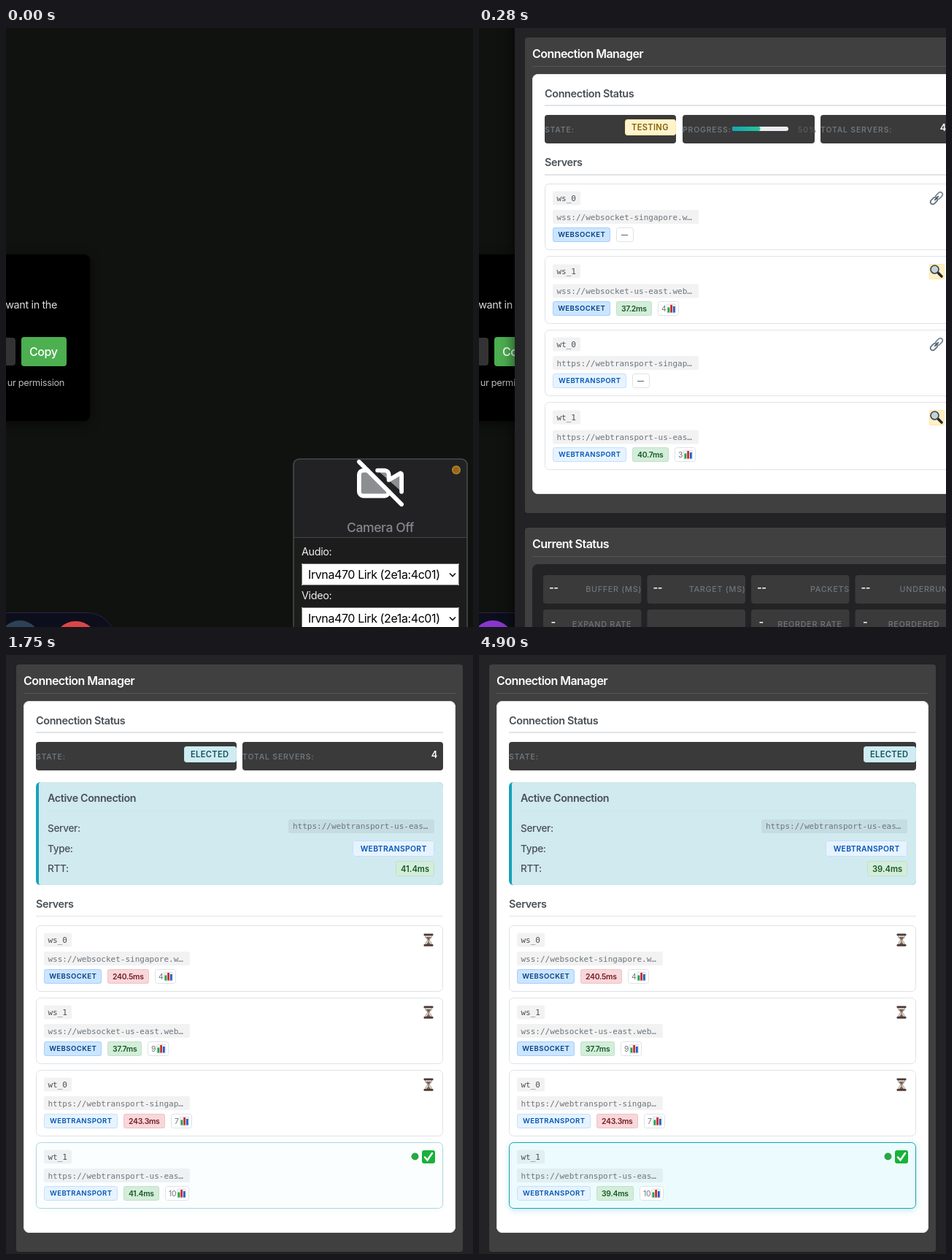
Animation, 640 px wide and 820 px high, one loop 5.46 s. Source, as an HTML page with a canvas:

```html
<!DOCTYPE html>
<html lang="en">
<head>
<meta charset="utf-8">
<title>Connection Manager</title>
<style>
html, body { margin: 0; width: 100%; height: 100%; overflow: hidden; background: #10120f; }
canvas { display: block; }
</style>
</head>
<body>
<canvas id="stage" width="640" height="820"></canvas>
<script>
const c = document.getElementById('stage').getContext('2d');
const LOOP = 5460, STEP = 70;
const SANS = 'Inter, "Liberation Sans", sans-serif';
const MONO = '"DejaVu Sans Mono", "Liberation Mono", monospace';
const GREY = '#495057', MUTED = '#6c757d', LINE = '#dee2e6', DARK = '#3a3a3a';
const DEVICE = 'Irvna470 Lirk (2e1a:4c01)';
const CAMERA = [
  'M10.66 6H14a2 2 0 0 1 2 2v2.5l5.248-3.062A.5.5 0 0 1 22 7.87v8.196',
  'M16 16a2 2 0 0 1-2 2H4a2 2 0 0 1-2-2V8a2 2 0 0 1 2-2h2',
  'M2 2l20 20'
].map(d => new Path2D(d));

const clamp = v => Math.max(0, Math.min(1, v));
const mix = (a, b, k) => `rgb(${a.map((v, i) => Math.round(v + (b[i] - v) * k))})`;

// CSS "ease" timing curve
function ease(x) {
  x = clamp(x);
  let lo = 0, hi = 1, s = x;
  for (let i = 0; i < 24; i++) {
    s = (lo + hi) / 2;
    if (.75 * s * (1 - s) + s ** 3 < x) lo = s; else hi = s;
  }
  return .3 * s * (1 - s) ** 2 + 3 * s * s * (1 - s) + s ** 3;
}

function box(x, y, w, h, r, fill, border) {
  c.beginPath();
  c.roundRect(x, y, w, h, r);
  c.fillStyle = fill;
  c.fill();
  if (!border) return;
  c.beginPath();
  c.roundRect(x + .5, y + .5, w - 1, h - 1, r);
  c.strokeStyle = border;
  c.lineWidth = 1;
  c.stroke();
}

function disc(x, y, r, fill) {
  c.beginPath();
  c.arc(x, y, r, 0, 7);
  c.fillStyle = fill;
  c.fill();
}

function line(color, width, ...pts) {
  c.beginPath();
  for (let i = 0; i < pts.length; i += 2) c.lineTo(pts[i], pts[i + 1]);
  c.strokeStyle = color;
  c.lineWidth = width;
  c.stroke();
}

function shadow(color, blur, dx, dy, draw) {
  c.save();
  c.shadowColor = color;
  c.shadowBlur = blur;
  c.shadowOffsetX = dx;
  c.shadowOffsetY = dy;
  draw();
  c.restore();
}

// y is the middle of the capitals
function text(s, x, y, size, color, { weight = 400, gap = -.025 * size, align = 'left', font = SANS } = {}) {
  c.font = `${weight} ${size}px ${font}`;
  c.letterSpacing = gap + 'px';
  c.textAlign = align;
  c.fillStyle = color;
  c.fillText(s, x, y + .364 * size);
}

const width = (s, size, weight) => {
  c.font = `${weight} ${size}px ${SANS}`;
  c.letterSpacing = -.025 * size + 'px';
  return c.measureText(s).width;
};
const mono = (s, x, y, color) => text(s, x, y, 11, color, { font: MONO, gap: 0 });
const label = (s, x, y, color = MUTED) => text(s, x, y, 10.4, color, { weight: 600, gap: .85 });
const heading = (s, x, y, color = GREY) => text(s, x, y, 14.4, color, { weight: 600 });

function drawPage(t) {
  c.fillStyle = '#10120f';
  c.fillRect(0, 0, 640, 820);

  shadow('rgba(0,0,0,.5)', 14, 0, 3, () => box(-300, 310, 415, 228, 8, '#000'));
  text('want in the', 70, 379, 14.4, '#ddd', { align: 'right' });
  box(-100, 424, 113, 38, 4, '#333');
  box(21, 423, 62, 40, 4, '#4caf50');
  text('Copy', 32, 443.5, 16, '#fff', { weight: 500 });
  text('ur permission', 80, 485, 12.8, '#bbb', { align: 'right' });

  box(-200, 800, 351, 80, 40, '#0c0f1b', '#2a2148');
  disc(19, 839, 28, t < 70 ? '#2c4257' : '#8936cf');
  disc(95.5, 842, 30, '#dc4548');

  box(394, 590, 239, 300, 8, '#1c1c1d');
  box(394, 590, 239, 107, [8, 8, 0, 0], '#222224');
  c.beginPath();
  c.roundRect(394, 590, 238, 300, 8);
  c.strokeStyle = '#484b4c';
  c.lineWidth = 1.5;
  c.stroke();
  line('#444648', 1, 395, 697.5, 631, 697.5);

  c.save();
  c.translate(478.1, 588.1);
  c.scale(2.91, 2.91);
  c.lineCap = c.lineJoin = 'round';
  c.fillStyle = '#8c8f92';
  c.strokeStyle = '#fff';
  c.lineWidth = 2;
  CAMERA.forEach(p => { c.fill(p); c.stroke(p); });
  c.restore();
  disc(617, 605, 6, '#bd862a');
  disc(617, 605, 4.5, '#94691c');
  text('Camera Off', 467, 684, 17.6, '#84878a', { weight: 500 });

  [['Audio:', 717], ['Video:', 777]].forEach(([name, y]) => {
    text(name, 405, y, 14.4, '#eee');
    box(405, y + 16, 216, 30, 1, '#fff', '#767676');
    text(DEVICE, 414, y + 31, 16, '#000');
    line('#111', 1.6, 608, y + 29.5, 612, y + 33.5, 616, y + 29.5);
  });
}

const icons = {
  search(x, y) {
    box(x - 10, y - 10, 21, 21, 1, '#fff0c4', '#fce8ac');
    c.lineCap = 'round';
    line('#26282b', 3.6, x + 2.5, y + 2.5, x + 7, y + 7);
    c.lineCap = 'butt';
    disc(x - 2.5, y - 2.5, 6.3, '#3b4248');
    disc(x - 2.5, y - 2.5, 4.7, '#c3d3da');
  },
  link(x, y) {
    c.save();
    c.translate(x, y);
    c.rotate(-Math.PI / 4);
    c.lineWidth = 1.9;
    [[-10.5, '#66747f'], [-.5, '#7d8c98']].forEach(([left, color]) => {
      c.beginPath();
      c.roundRect(left, -3.2, 11, 6.4, 3.2);
      c.strokeStyle = color;
      c.stroke();
    });
    line('#4d5962', 1.8, -4, 0, 4, 0);
    c.restore();
  },
  wait(x, y) {
    c.beginPath();
    [[-5, -7], [5, -7], [4, -3], [1, 0], [4, 4], [5, 7], [-5, 7], [-4, 4], [-1, 0], [-4, -3]]
      .forEach(([dx, dy]) => c.lineTo(x + dx, y + dy));
    c.closePath();
    c.fillStyle = '#d5dde0';
    c.fill();
    c.strokeStyle = '#8b9295';
    c.lineWidth = .8;
    c.stroke();
    c.fillStyle = '#8f5a3c';
    c.beginPath();
    [[-3.5, -4], [3.5, -4], [.5, 0], [.5, 3], [4, 7], [-4, 7], [-.5, 3], [-.5, 0]]
      .forEach(([dx, dy]) => c.lineTo(x + dx, y + dy));
    c.fill();
    box(x - 6.5, y - 8.5, 13, 2.8, 1, '#4b3a37');
    box(x - 6.5, y + 6, 13, 2.8, 1, '#4b3a37');
  },
  done(x, y) {
    disc(x - 18.5, y - .5, 5, '#28a745');
    box(x - 9, y - 9, 18, 18, 3, '#18b23a');
    c.lineCap = 'round';
    line('#fff', 2.5, x - 5, y + .5, x - 1.5, y + 4.5, x + 5, y - 5);
    c.lineCap = 'butt';
  }
};

function chart(x, y) {
  box(x, y - 6.5, 13, 13, 1, '#f2f5f6', '#dfe5e8');
  [[1.5, 7, '#1ea446'], [5.2, 10.5, '#d42a2f'], [8.9, 8.5, '#1f5fc4']].forEach(([dx, h, color]) => {
    c.fillStyle = color;
    c.fillRect(x + dx, y + 5.5 - h, 2.8, h);
  });
}

function typeBadge(s, x, y, w, h, size, gap) {
  const ws = s === 'WEBSOCKET';
  box(x, y - h / 2, w, h, 3, ws ? '#cce5ff' : '#e7f3ff', ws ? '#a3cfff' : '#c4e0fb');
  text(s, x + w / 2 + gap / 2, y, size, ws ? '#004085' : '#0056b3', { weight: 600, gap, align: 'center' });
}

function rttBadge(rtt, x, y) {
  const s = rtt + 'ms', w = Math.round(width(s, 10.4, 600)) + 14, slow = rtt > 200;
  box(x, y - 10, w, 20, 3, slow ? '#f8d7da' : '#d4edda', slow ? '#f0c2c7' : '#bfe2c8');
  text(s, x + 7, y, 10.4, slow ? '#721c24' : '#155724', { weight: 600 });
  return w;
}

function drawServer([id, url, type, rtt, count, icon], y, lit) {
  const big = icon === 'search', h = big ? 93 : 91;
  const idY = y + (big ? 21 : 20), urlY = y + (big ? 48 : 45.5), tagY = y + (big ? 72 : 70);
  const fill = mix([255, 255, 255], [236, 252, 254], lit);
  shadow(`rgba(23,162,184,${.25 * lit})`, 8, 0, 2, () => box(41, y, 558, h, 6, fill));
  box(41, y, 558, h, 6, fill, mix([222, 226, 230], [23, 162, 184], lit));

  box(52, idY - 9.5, 38, 19, 2, 'rgba(0,0,0,.052)');
  mono(id, 57.5, idY, GREY);
  box(52, urlY - 9.5, 200, 19, 2, 'rgba(0,0,0,.052)');
  mono(url, 57.5, urlY, MUTED);

  const typeW = type === 'WEBSOCKET' ? 79 : 101;
  typeBadge(type, 52, tagY, typeW, 20, 9.6, .4);
  let x = 52 + typeW + 8;
  if (rtt) {
    x += rttBadge(rtt, x, tagY) + 8;
    const w = Math.round(width(count, 10.4, 400));
    box(x, tagY - 10, w + 23, 20, 3, '#fff', LINE);
    text(count, x + 5, tagY, 10.4, MUTED);
    chart(x + 6 + w, tagY);
  } else {
    box(x, tagY - 10, 24, 20, 3, '#fff', LINE);
    line(MUTED, 1.2, x + 7, tagY + .5, x + 16, tagY + .5);
  }
  icons[icon](icon === 'wait' || icon === 'done' ? 579 : 578, idY);
  return y + h + 8;
}

function stateBox(x, w, name, badge, fill, border, color) {
  box(x, 119, w, 39, 4, DARK);
  label(name, x, 139.5);
  if (!badge) return;
  const bw = badge === 'TESTING' ? 70 : 72;
  box(x + w - bw, 125, bw, 22, 4, fill, border);
  text(badge, x + w - bw + 9, 136, 11.2, color, { weight: 600, gap: .3 });
}

function drawStates(t) {
  const testing = t < 1750;
  const w = testing ? 180 : t < 4900 ? 275 : 558;
  if (testing) stateBox(41, w, 'STATE:', 'TESTING', '#fff3cd', '#ffe8a0', '#856404');
  else stateBox(41, w, 'STATE:', 'ELECTED', '#d1ecf1', '#bee5eb', '#0c5460');
  if (testing) {
    stateBox(230, 181, 'PROGRESS:');
    const bar = 77 * (.5 + .5 * ease((t - 690) / 300));
    box(298, 135, 77, 6, 3, '#e9ecef');
    const grad = c.createLinearGradient(298, 0, 298 + bar, 0);
    grad.addColorStop(0, '#17a2b8');
    grad.addColorStop(1, '#20c997');
    box(298, 135, bar, 6, 3, grad);
    label(t < 700 ? '50%' : '100%', t < 700 ? 388 : 385, 139.5, '#53595f');
  }
  if (t < 4900) {
    const x = testing ? 419 : 324;
    stateBox(x, 599 - x, 'TOTAL SERVERS:');
    text('4', 591, 136, 12.8, '#fff', { weight: 600, align: 'right' });
  }
}

function drawActive(rtt) {
  box(41, 174, 558, 141, 6, '#17a2b8');
  box(45, 174, 554, 141, [3, 6, 6, 3], '#d0eaef');
  line('#cce5ea', 1, 57, 213.5, 587, 213.5);
  text('Active Connection', 57, 196, 14.3, GREY, { weight: 600 });
  [['Server:', 237.5], ['Type:', 265.5], ['RTT:', 292.5]].forEach(([s, y]) =>
    text(s, 57, y, 13.6, GREY, { weight: 500 }));
  box(387, 225, 200, 19, 2, 'rgba(0,0,0,.055)');
  mono('https://webtransport-us-eas…', 393, 234, MUTED);
  typeBadge('WEBTRANSPORT', 475, 265, 112, 22, 10.4, .3);
  const s = rtt + 'ms';
  c.font = `600 11.2px ${SANS}`;
  c.letterSpacing = '0px';
  const w = Math.round(c.measureText(s).width) + 14;
  box(587 - w, 282, w, 21, 3, '#d4edda', '#bfe2c8');
  text(s, 594 - w, 293, 11.2, '#155724', { weight: 600, gap: 0 });
}

function section(title, y, h) {
  box(14, y, 612, h, 4, '#404040');
  text(title, 24, y + 22, 16, '#fff', { weight: 600, gap: -.55 });
  line('#575757', 1, 24, y + 39.5, 616, y + 39.5);
}

function drawStats(y) {
  section('Current Status', y, 400);
  box(24, y + 50, 592, 300, 8, '#232325');
  const stat = { weight: 500, gap: .7 };
  ['BUFFER (MS)', 'TARGET (MS)', 'PACKETS', 'UNDERRUNS'].forEach((s, i) => {
    const x = 39 + 142.5 * i;
    box(x, y + 65, 134.5, 39, 4, DARK);
    text('--', x + 8, y + 82, 14.4, '#fff', { weight: 600 });
    text(s, x + 135, y + 84.5, 10.8, '#6e747a', { ...stat, align: 'right' });
  });
  ['EXPAND RATE', '', 'REORDER RATE', 'REORDERED'].forEach((s, i) => {
    const x = 39 + 142.5 * i;
    box(x, y + 112, 134.5, 60, 4, DARK);
    if (!s) return;
    text('-', x + 10.5, y + 129, 14.4, '#fff', { weight: 600 });
    text(s, x + 80.5, y + 132.5, 10.8, '#6e747a', { ...stat, align: 'center' });
  });
}

function servers(t, rtt) {
  const [tags, marks] =
    t < 700 ? [[[], ['37.2', '4'], [], ['40.7', '3']], ['link', 'search', 'link', 'search']] :
    t < 1750 ? [[['240.5', '4'], ['37.7', '9'], ['244.4', '5'], ['41.5', '8']], Array(4).fill('search')] :
    [[['240.5', '4'], ['37.7', '9'], ['243.3', '7'], [rtt, '10']], ['wait', 'wait', 'wait', 'done']];
  return [
    ['ws_0', 'wss://websocket-singapore.w…', 'WEBSOCKET'],
    ['ws_1', 'wss://websocket-us-east.web…', 'WEBSOCKET'],
    ['wt_0', 'https://webtransport-singap…', 'WEBTRANSPORT'],
    ['wt_1', 'https://webtransport-us-eas…', 'WEBTRANSPORT']
  ].map((row, i) => [...row, tags[i][0], tags[i][1], marks[i]]);
}

function drawPanel(t) {
  const elected = t >= 1750;
  const rtt = t < 2800 ? '41.4' : t < 3850 ? '42.4' : t < 4900 ? '42.8' : '39.4';
  const rows = servers(t, rtt);
  const top = elected ? 370 : 213;
  const end = rows.reduce((y, r) => y + (r[5] === 'search' ? 101 : 99), top) - 8;

  shadow('rgba(0,0,0,.5)', 16, -3, 0, () => box(0, -20, 660, 860, 0, '#232325'));
  section('Connection Manager', 13, end + 46);
  box(24, 63, 592, end - 30, 8, '#fff', '#e6e8ea');
  heading('Connection Status', 41, 90);
  c.fillStyle = '#e1e4e8';
  c.fillRect(41, 105, 558, 2);
  drawStates(t);
  if (elected) drawActive(rtt);
  heading('Servers', 41, top - 29);
  c.fillStyle = '#e1e4e8';
  c.fillRect(41, top - 13, 558, elected ? 1 : 2);

  const lit = elected ? ease((t - 1710) / 240) : 0;
  rows.reduce((y, row, i) => drawServer(row, y, i === 3 ? lit : 0), top);
  drawStats(end + 79);
}

function frame(now) {
  const t = Math.floor(now % LOOP / STEP) * STEP;
  const slide = 640 * (1 - ease((t - 71.2) / 315));
  if (slide > 0) drawPage(t);
  if (t > 70) {
    c.save();
    c.translate(Math.round(slide), 0);
    drawPanel(t);
    c.restore();
  }
}

const start = performance.now();
function tick() {
  frame(performance.now() - start);
  requestAnimationFrame(tick);
}
tick();
</script>
</body>
</html>
```
